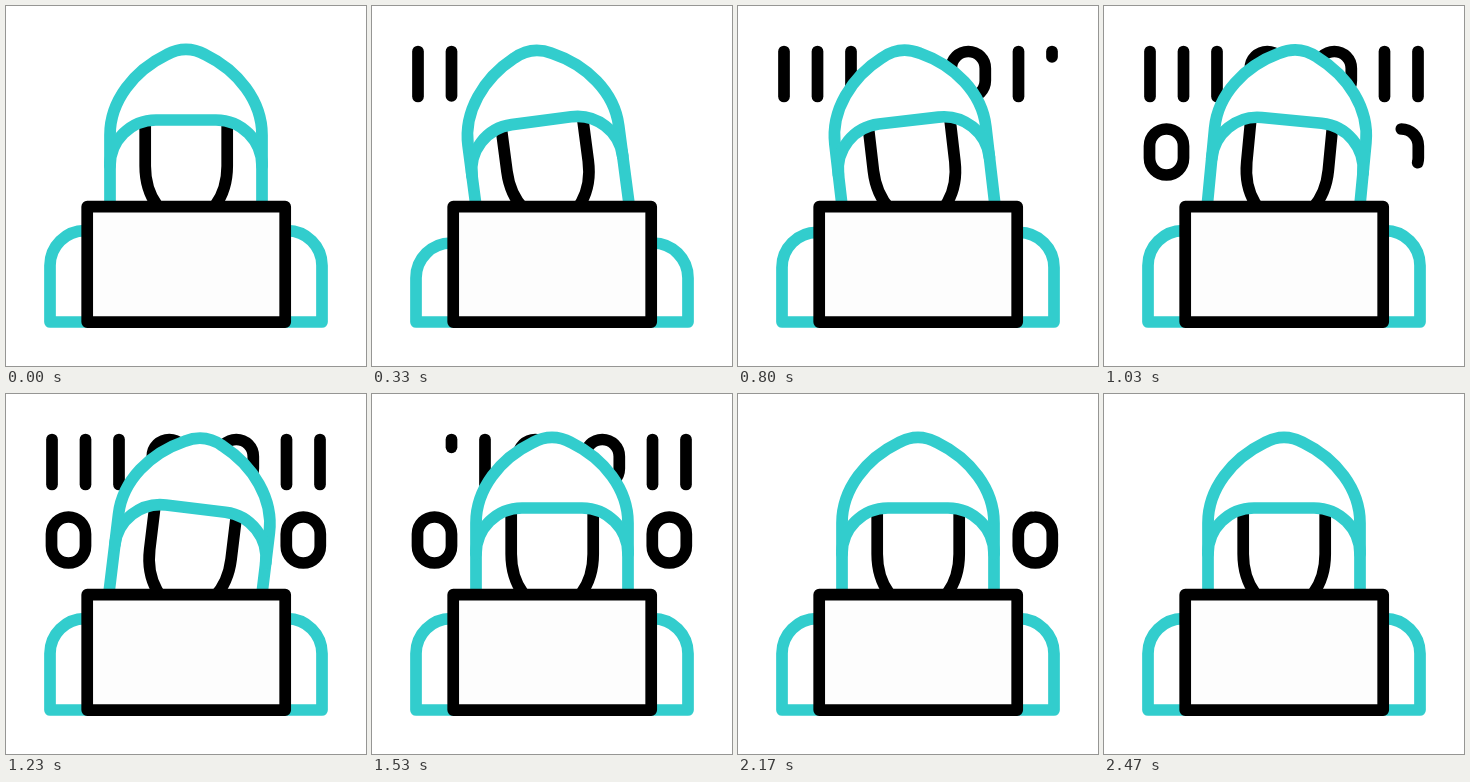
Recreate the animation shown at these times as an HTML page. Size 360 px wide and 360 px high, loop 2.5 s.

```html
<!DOCTYPE html>
<html lang="en">
<head>
<meta charset="utf-8">
<title>Hacker icon</title>
<style>
  html, body { margin: 0; width: 100%; height: 100%; overflow: hidden; background: #fff; }
  svg { display: block; width: 100vw; height: 100vh; }
  path, rect { fill: none; stroke: #000; stroke-width: 11.7; stroke-linecap: round; stroke-linejoin: round; }
  .teal { stroke: #32cdcd; }
  .mask { fill: #fff; stroke: none; }
  .screen { fill: #fdfdfd; }
</style>
</head>
<body>
<svg viewBox="0 0 360 360">
  <g id="digits"></g>
  <g id="head">
    <path class="mask" d="M104 225V129C104 95 128 64.5 161 48.5C174 41.5 186 41.5 199 48.5C232 64.5 256 95 256 129V225Z"/>
    <path d="M139.2 118V160A41 56 0 0 0 221.2 160V118"/>
    <path class="teal" d="M104 225V129C104 95 128 64.5 161 48.5C174 41.5 186 41.5 199 48.5C232 64.5 256 95 256 129V225"/>
    <path class="teal" d="M104 160A46 46 0 0 1 150 114H210A46 46 0 0 1 256 160"/>
  </g>
  <path id="shoulders" class="teal"/>
  <rect class="screen" x="81.2" y="200.7" width="198" height="115.4"/>
</svg>
<script>
  const LOOP = 2500;
  const byId = id => document.getElementById(id);
  const clamp = x => Math.min(1, Math.max(0, x));
  const smooth = x => x * x * (3 - 2 * x);

  // Eased value at time t from [time, value] keys.
  function tween(t, keys) {
    let value = keys[0][1];
    for (let i = 1; i < keys.length; i++) {
      const [t0, v0] = keys[i - 1], [t1, v1] = keys[i];
      if (t >= t0) value = v0 + (v1 - v0) * smooth(clamp((t - t0) / (t1 - t0)));
    }
    return value;
  }

  const one = x => `M${x} 45.5V90.5`;
  // side -1 draws counterclockwise, 1 clockwise
  const zero = (x, y, side) => {
    const r = 17, sweep = side > 0 ? 1 : 0;
    const arc = (px, py) => `A${r} ${r} 0 0 ${sweep} ${px} ${py}`;
    const near = x + side * r, far = x - side * r;
    return `M${x} ${y}` + arc(near, y + r) + `V${y + 29}` + arc(x, y + 46) +
      arc(far, y + 29) + `V${y + r}` + arc(x, y);
  };

  const digits = [
    one(46), one(79.5), one(113), zero(163.3, 45.5, -1), zero(230.3, 45.5, -1),
    one(280.5), one(314), zero(62.5, 123, 1), zero(297.3, 123, 1)
  ].map(d => {
    const path = document.createElementNS('http://www.w3.org/2000/svg', 'path');
    path.setAttribute('d', d);
    path.setAttribute('pathLength', 1);
    return byId('digits').appendChild(path);
  });

  function draw(t) {
    digits.forEach((path, i) => {
      const shown = clamp((t - 150 - 107 * i) / 75) - clamp((t - 1369 - 100 * i) / 75);
      path.style.visibility = shown > 0 ? 'visible' : 'hidden';
      path.style.strokeDasharray = shown < 1 ? `${shown} 2` : 'none';
    });

    const tilt = tween(t, [[0, 0], [600, -13], [1150, 8], [1500, 0]]);
    byId('head').setAttribute('transform', `rotate(${tilt} 180 195)`);

    const top = tween(t, [[0, 224.6], [450, 239.6], [900, 224.6]]);
    byId('shoulders').setAttribute('d',
      `M81 316H44V${top + 35}A35 35 0 0 1 79 ${top}M279 316H316V${top + 35}A35 35 0 0 0 281 ${top}`);
  }

  function tick() {
    draw(performance.now() % LOOP);
    requestAnimationFrame(tick);
  }
  tick();
</script>
</body>
</html>
```
